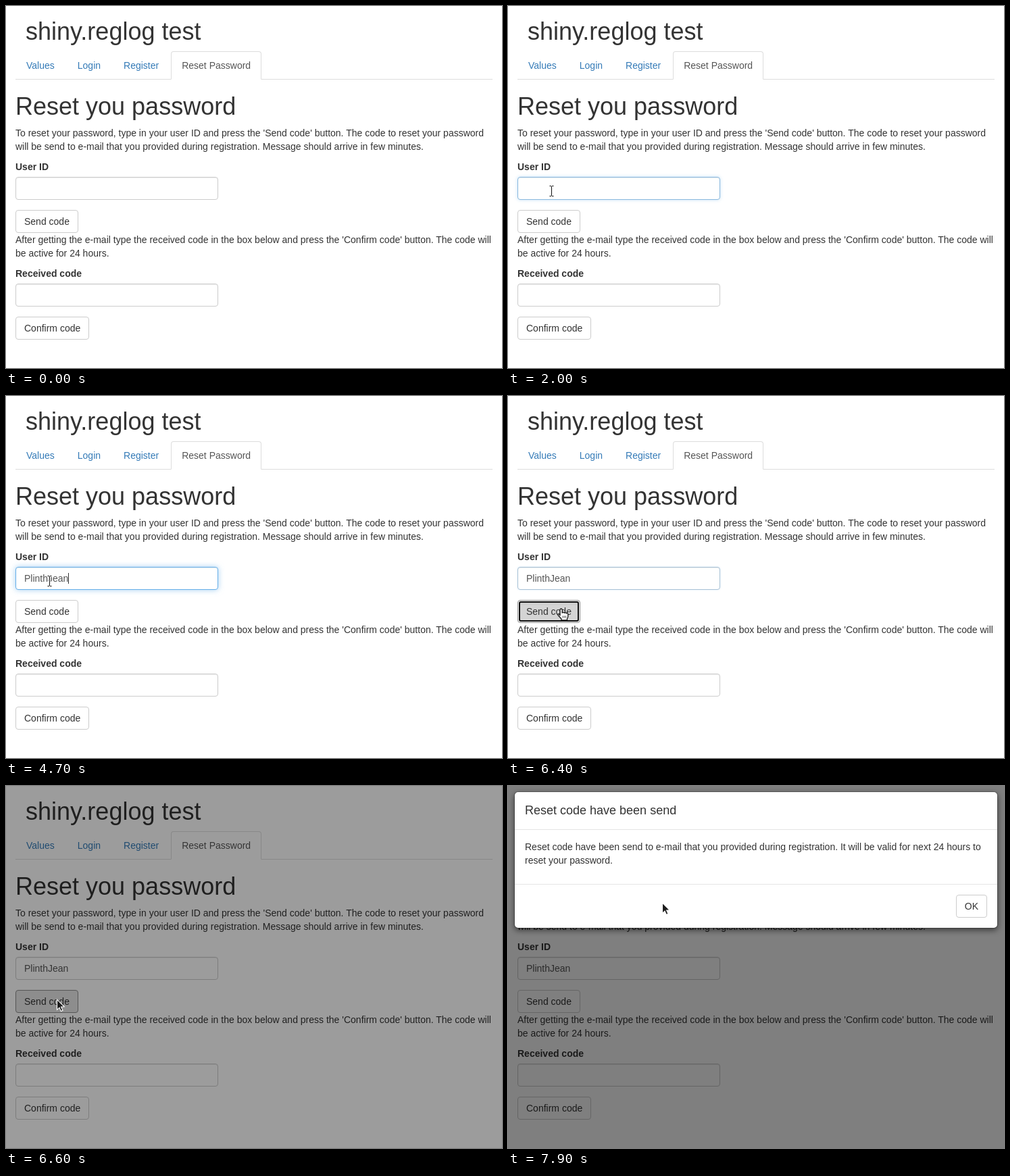
These frames come from a looping animation (734 by 536 pixels, 8 s). An HTML page:

```html
<!DOCTYPE html>
<html lang="en">
<head>
<meta charset="utf-8">
<title>shiny.reglog test</title>
<style>
  * { box-sizing: border-box; }
  html, body { margin: 0; width: 100%; height: 100%; overflow: hidden; background: #fff; }
  #stage {
    position: relative; width: 734px; height: 536px; overflow: hidden; background: #fff;
    font: 14px/20px "Liberation Sans", Arial, sans-serif; color: #333; cursor: default;
  }
  #stage > *, .modal > * { position: absolute; margin: 0; white-space: nowrap; }
  h1 { left: 14px; font-size: 36px; line-height: 41px; font-weight: 400; }
  p, label, .field, .btn { left: 14px; }
  label { font-weight: 700; }
  .tabs { left: 14px; top: 67px; width: 706px; height: 42px; display: flex; border-bottom: 1px solid #ddd; }
  .tabs span { height: 42px; padding: 10px 15px; margin-right: 2px; border: 1px solid transparent; color: #337ab7; }
  .tabs .on { color: #555; background: #fff; border-color: #ddd #ddd #fff; border-radius: 4px 4px 0 0; }
  .field {
    width: 300px; height: 34px; padding: 6px 12px; color: #555; background: #fff;
    border: 1px solid #ccc; border-radius: 4px; box-shadow: inset 0 1px 1px rgba(0,0,0,.075);
  }
  .caret { position: absolute; top: 8px; width: 1px; height: 16px; background: #333; }
  .btn { height: 34px; padding: 6px 12px; background: #fff; border: 1px solid #ccc; border-radius: 4px; }
  .btn.hover { background: #e6e6e6; border-color: #adadad; }
  .btn.focus { background: #e6e6e6; border-color: #8c8c8c; }
  .btn.press { background: #d4d4d4; border-color: #8c8c8c; box-shadow: inset 0 3px 5px rgba(0,0,0,.125); }
  .btn.press::after {
    content: ""; position: absolute; inset: 1px; border: 2px solid #101010;
    border-radius: 3px; box-shadow: 0 0 0 1px #fff;
  }
  #shade { inset: 0; background: #000; }
  .modal {
    left: 9px; top: 8px; width: 716px; height: 203px; background: #fff; background-clip: padding-box;
    border: 1px solid rgba(0,0,0,.2); border-radius: 6px; box-shadow: 0 3px 9px rgba(0,0,0,.5);
  }
  .modal h4 { left: 15px; top: 15px; font-size: 18px; line-height: 24px; font-weight: 400; }
  .modal p { left: 15px; top: 71px; }
  .modal hr { left: 0; right: 0; height: 1px; border: 0; background: #e5e5e5; }
  .modal .btn { left: auto; right: 15px; top: 152px; }
  #pointer { left: 0; top: 0; width: 22px; height: 22px; overflow: visible; }
</style>
</head>
<body>
<div id="stage">
  <h1 style="left:29px;top:17px">shiny.reglog test</h1>
  <div class="tabs"><span>Values</span><span>Login</span><span>Register</span><span class="on">Reset Password</span></div>
  <h1 style="top:128px">Reset you password</h1>
  <p style="top:178px">To reset your password, type in your user ID and press the 'Send code' button. The code to reset your password<br>will be send to e-mail that you provided during registration. Message should arrive in few minutes.</p>
  <label style="top:228px">User ID</label>
  <div class="field" id="user" style="top:253px"><span id="typed"></span><i class="caret" id="caret"></i></div>
  <div class="btn" id="send" style="top:302px">Send code</div>
  <p style="top:336px">After getting the e-mail type the received code in the box below and press the 'Confirm code' button. The code will<br>be active for 24 hours.</p>
  <label style="top:386px">Received code</label>
  <div class="field" style="top:411px"></div>
  <div class="btn" style="top:460px">Confirm code</div>
  <div id="shade"></div>
  <div class="modal" id="modal">
    <h4>Reset code have been send</h4>
    <hr style="top:55px">
    <p>Reset code have been send to e-mail that you provided during registration. It will be valid for next 24 hours to<br>reset your password.</p>
    <hr style="top:136px">
    <div class="btn">OK</div>
  </div>
  <svg id="pointer" viewBox="0 0 22 22">
    <g id="beam" fill="none" stroke-linecap="square">
      <path d="M2 2.5H3.5M5.5 2.5H7M4.5 3.5V16.5M2 17.5H3.5M5.5 17.5H7" stroke="#fff" stroke-width="3"/>
      <path d="M2 2.5H3.5M5.5 2.5H7M4.5 3.5V16.5M2 17.5H3.5M5.5 17.5H7" stroke="#1a1a1a" stroke-width="1.1"/>
    </g>
    <g id="hand" stroke="#161616" stroke-linejoin="round">
      <path fill="#fff" stroke-width="1.3" d="M4 11V2.6a1.6 1.6 0 0 1 3.2 0V7.2q.2-1 1.5-1t1.6 1.2q.2-.9 1.4-.8t1.5 1.3q.3-.8 1.4-.5t1.2 1.6V12q0 2-1.3 3.6V17.8H6V16L1.2 10.8Q.3 9.2 1.5 8.7T4 11Z"/>
      <path fill="none" stroke-width=".8" d="M8.2 11.5v3M10.4 11.5v3M12.6 11.5v3"/>
    </g>
    <path id="arrow" fill="#1c1c1c" stroke="#fff" stroke-width="1.1" d="M1.5 1.2V16.3L5 13.1L7.4 18.4L10 17.2L7.6 12.1L12.2 11.8Z"/>
  </svg>
</div>
<script>
const LOOP = 8000, TICK = 100;
const NAME = "PlinthJean";
const KEYS = [3000, 3200, 3300, 3500, 3700, 3800, 4200, 4400, 4600, 4700];
// time, left, top, shape
const PATH = [
  [0, 0, 0, ""], [600, 171, 83, "beam"], [800, 216, 213, "beam"],
  [1000, 206, 226, "arrow"], [1100, 176, 262, "arrow"], [1200, 138, 304, "arrow"],
  [1300, 111, 319, "hand"], [1400, 95, 321, "hand"], [1500, 82, 313, "hand"],
  [1600, 71, 300, "hand"], [1700, 62, 268, "beam"], [1800, 60, 242, "beam"],
  [1900, 60, 264, "beam"], [5800, 63, 276, "beam"], [5900, 67, 295, "hand"],
  [6100, 73, 314, "hand"], [6500, 74, 315, "arrow"], [7600, 82, 307, "arrow"],
  [7800, 182, 208, "arrow"], [7900, 227, 172, "arrow"]
];
// time, state of the send button
const STATES = [[0, ""], [1400, "hover"], [1700, ""], [5900, "hover"], [6400, "press"], [6500, "focus"], [7000, ""]];

const el = id => document.getElementById(id);
const [user, typed, caret, send, shade, modal, pointer] =
  ["user", "typed", "caret", "send", "shade", "modal", "pointer"].map(el);
const shapes = ["beam", "hand", "arrow"].map(el);

const ramp = (t, start, span) => Math.min(1, Math.max(0, (t - start) / span));
const smooth = x => x * x * (3 - 2 * x);
const latest = (list, t) => list.filter(k => k[0] <= t).pop();
const mix = (a, b, k) => a.map((v, i) => Math.round(v + (b[i] - v) * k));

function drawField(t) {
  const glow = smooth(ramp(t, 1910, 150)) - smooth(ramp(t, 6310, 150));
  user.style.borderColor = `rgb(${mix([204, 204, 204], [102, 175, 233], glow)})`;
  user.style.boxShadow =
    `inset 0 1px 1px rgba(0,0,0,.075), 0 0 ${8 * glow}px rgba(102,175,233,${0.6 * glow})`;

  const count = KEYS.filter(k => k <= t).length;
  typed.textContent = NAME.slice(0, count);
  const since = t - (count ? KEYS[count - 1] : 2100);
  const lit = t >= 2100 && t < 6400 && since % 1200 < 600;
  caret.style.visibility = lit ? "visible" : "hidden";
}

function drawModal(t) {
  shade.style.opacity = 0.5 * ramp(t, 6483, 150);
  const drop = Math.pow(1 - ramp(t, 6668, 300), 1.68);
  modal.style.opacity = ramp(t, 6668, 150);
  modal.style.transform = drop ? `translateY(${-50.75 * drop}px)` : "none";
}

function drawPointer(t) {
  const [, x, y, shape] = latest(PATH, t);
  pointer.style.transform = `translate(${x}px, ${y}px)`;
  for (const s of shapes) s.style.display = s.id === shape ? "" : "none";
}

// The screen refreshes ten times a second.
function draw(ms) {
  const t = Math.floor((ms % LOOP) / TICK) * TICK;
  drawField(t);
  send.className = "btn " + latest(STATES, t)[1];
  drawModal(t);
  drawPointer(t);
}

const start = performance.now();
function loop() {
  draw(performance.now() - start);
  requestAnimationFrame(loop);
}
loop();
</script>
</body>
</html>
```
